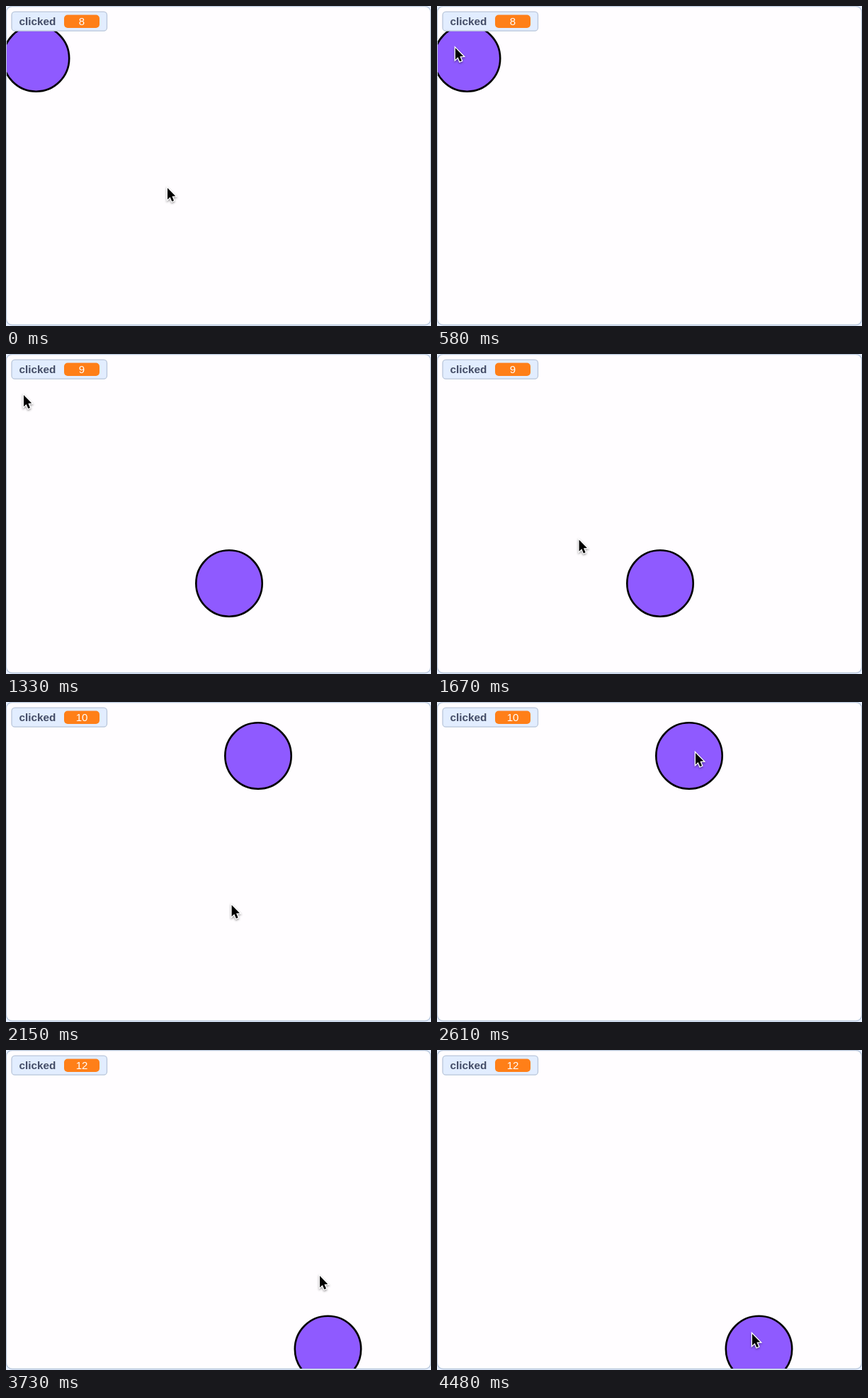
Write an HTML page with a canvas that moves like this. It is 600x452 px and loops after 4.51 s.

```html
<!DOCTYPE html>
<html lang="en">
<head>
<meta charset="utf-8">
<title>Click the ball</title>
<style>
  html, body { margin: 0; height: 100%; overflow: hidden; background: #e6efff; }
  canvas { display: block; }
</style>
</head>
<body>
<canvas id="stage" width="600" height="452"></canvas>
<script>
const ctx = document.getElementById('stage').getContext('2d');
const LOOP = 4510;
const FONT = '"Liberation Sans", Arial, sans-serif';

// Ball positions: [start ms, x, y]; every jump adds one to the counter.
const jumps = [
  [0, 42.5, 74], [1320, 315, 324], [1990, 356, 76], [2850, 443, 310], [3540, 454.5, 422.5]
];

// Pointer path: [ms, x, y]
const path = [
  [0, 228, 256], [60, 228, 256], [520, 27, 60], [700, 25, 57], [1400, 25, 57],
  [1670, 200, 261], [1880, 312, 318], [2080, 314, 316], [2210, 325, 245],
  [2480, 365, 71], [2890, 365, 71], [3090, 402, 292], [3230, 440, 308],
  [3600, 441, 310], [3730, 443, 318], [4000, 449, 402], [4200, 448, 403],
  [4480, 445, 400], [LOOP, 445, 400]
];

const arrow = [[0, 0], [0, 16.3], [3.7, 12.9], [6.3, 19], [9, 17.9], [6.4, 11.8], [11.3, 11.6]];

const slope = (i, k) =>
  path[i] && path[i + 1] ? (path[i + 1][k] - path[i][k]) / (path[i + 1][0] - path[i][0]) : 0;

// Harmonic mean of the neighbouring slopes: smooth, without overshoot.
function tangent(i, k) {
  const a = slope(i - 1, k), b = slope(i, k);
  return a * b > 0 ? 2 * a * b / (a + b) : 0;
}

function pointerAt(t) {
  let i = 0;
  while (i < path.length - 2 && t >= path[i + 1][0]) i++;
  const d = path[i + 1][0] - path[i][0], u = (t - path[i][0]) / d, v = 1 - u;
  return [1, 2].map(k =>
    path[i][k] * (1 + 2 * u) * v * v + path[i + 1][k] * u * u * (3 - 2 * u) +
    d * u * v * (tangent(i, k) * v - tangent(i + 1, k) * u));
}

function box(x, y, w, h, r, fill, stroke) {
  ctx.beginPath();
  ctx.roundRect(x, y, w, h, r);
  ctx.fillStyle = fill;
  ctx.fill();
  if (!stroke) return;
  ctx.strokeStyle = stroke;
  ctx.lineWidth = 1.3;
  ctx.stroke();
}

function text(str, x, font, color, align) {
  ctx.font = font + ' ' + FONT;
  ctx.fillStyle = color;
  ctx.textAlign = align;
  ctx.fillText(str, x, 27);
}

function drawBall(x, y) {
  ctx.save();
  ctx.beginPath();
  ctx.roundRect(1, 1, 598, 449, 7);
  ctx.clip();
  ctx.beginPath();
  ctx.arc(x, y, 46.7, 0, 2 * Math.PI);
  ctx.fillStyle = '#8f5aff';
  ctx.fill();
  ctx.strokeStyle = '#000';
  ctx.lineWidth = 2.6;
  ctx.stroke();
  ctx.restore();
}

function drawPointer([x, y]) {
  ctx.save();
  ctx.translate(x, y + 1);
  ctx.beginPath();
  arrow.forEach(p => ctx.lineTo(...p));
  ctx.closePath();
  ctx.shadowColor = 'rgba(0,0,0,.4)';
  ctx.shadowBlur = 3;
  ctx.shadowOffsetY = 1.5;
  ctx.strokeStyle = '#fff';
  ctx.lineWidth = 2.6;
  ctx.stroke();
  ctx.shadowColor = 'transparent';
  ctx.fillStyle = '#000';
  ctx.fill();
  ctx.restore();
}

function draw(t) {
  const n = jumps.filter(j => j[0] <= t).length;
  ctx.clearRect(0, 0, 600, 452);
  box(.5, .5, 599, 450, 8, '#fffdff', '#b8c7dc');
  drawBall(jumps[n - 1][1], jumps[n - 1][2]);
  box(8, 8.2, 134.5, 27, 4.5, '#e2edff', '#b9c6da');
  text('clicked', 18.5, 'bold 15.3px', '#434c66', 'left');
  box(82, 12.5, 50, 18.5, 5, '#ff7f18');
  text(7 + n, 107, '15px', '#fff', 'center');
  drawPointer(pointerAt(t));
}

const start = performance.now();
function tick() {
  draw((performance.now() - start) % LOOP);
  requestAnimationFrame(tick);
}
tick();
</script>
</body>
</html>
```
